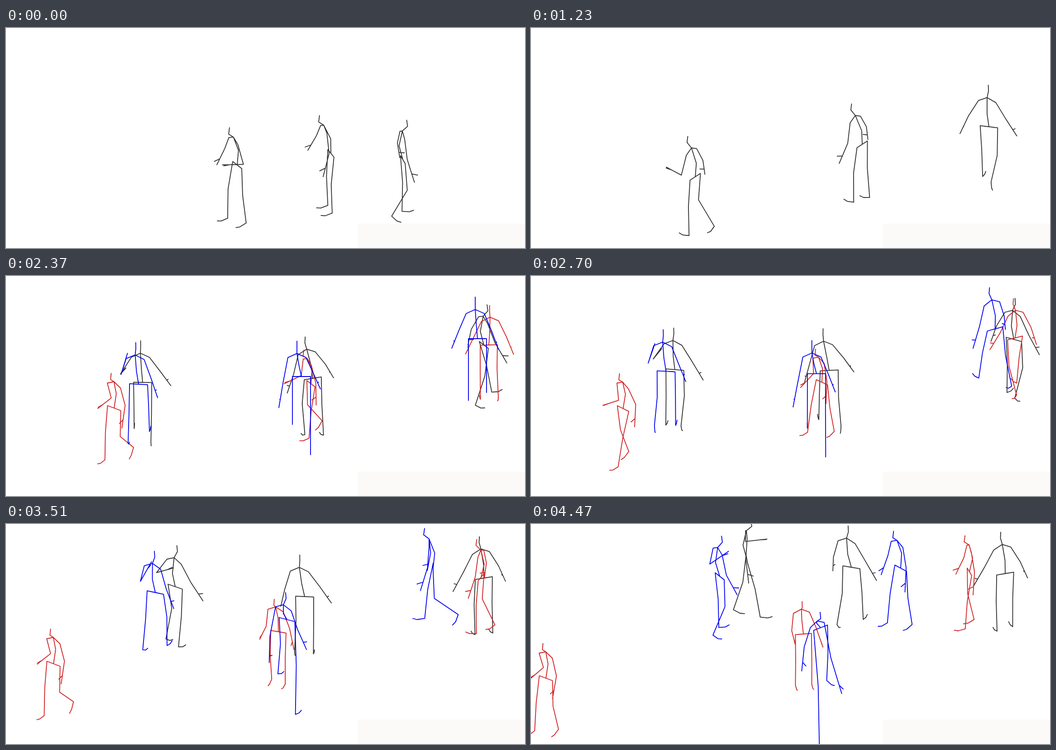
Write an HTML page that moves like this. It is 1147 by 488 pixels and loops after 4500 ms.

```html
<!DOCTYPE html>
<html lang="en">
<head>
<meta charset="utf-8">
<title>Walking skeletons</title>
<style>
html, body { margin: 0; width: 100%; height: 100%; overflow: hidden; background: #fff; }
svg { display: block; width: 1147px; height: 488px; }
path { fill: none; stroke-width: 1.8; stroke-linecap: round; stroke-linejoin: round; }
</style>
</head>
<body>
<svg viewBox="0 0 1147 488"><g id="people"></g><rect x="777" y="434" width="370" height="54" fill="#fbfaf8"/></svg>
<script>
const LOOP = 4500, STEP = 30, SPLIT = 1500, BLEND = 420;
const INK = '#303030', RED = '#d02222', BLUE = '#0000f0';
const TIMES = [0, 1230, 1920, 2370, 3030, 3510, 4470];
const TILT = 0.45;        // how much ground depth shows as height
const FULL_SPEED = 0.12;  // px per ms at which the stride is widest
const { sin, cos, min, max, floor, hypot, PI } = Math;
const mix = (a, b, f) => a + (b - a) * f;

// Smooth curve through keys of [time, x, y, heading].
function along(keys, time) {
  const last = keys.length - 1;
  const slope = (i, c) => {
    const a = keys[max(i - 1, 0)], b = keys[min(i + 1, last)];
    return (b[c] - a[c]) / (b[0] - a[0]);
  };
  let i = 0;
  while (i < last - 1 && keys[i + 1][0] <= time) i++;
  const a = keys[i], b = keys[i + 1], span = b[0] - a[0];
  const u = min(1, max(0, (time - a[0]) / span)), v = 1 - u;
  return [1, 2, 3].map(c =>
    a[c] * v * v * (1 + 2 * u) + b[c] * u * u * (3 - 2 * u) +
    span * u * v * (slope(i, c) * v - slope(i + 1, c) * u));
}

function pace(keys, time) {
  const [a, b] = [time - 60, time + 60].map(t => along(keys, min(LOOP - STEP, max(keys[0][0], t))));
  return min(1, hypot(b[0] - a[0], (b[1] - a[1]) / TILT) / 120 / FULL_SPEED);
}

// Polylines of one body; heading 0 looks right, 90 at the viewer.
function body(person, time) {
  const { keys, size = 1, lean = -5, period, phase, warp = 0 } = person;
  const [x, y, heading] = along(keys, time);
  const h = heading * PI / 180, amount = pace(keys, time);
  const grow = warp * max(0, time - SPLIT) / (LOOP - SPLIT);

  const move = ([px, py], ahead, side, down) => [
    px + size * (ahead * cos(h) + side * sin(h)),
    py + size * (TILT * (ahead * sin(h) - side * cos(h)) + down)
  ];
  const reach = (from, length, angle, out = 0) =>
    move(from, length * sin(angle) * cos(out), length * sin(out), length * cos(angle) * cos(out));

  const pelvis = [x, y];
  const [tx, ty] = move(pelvis, 4, 0, -63 * (1 - 0.75 * grow));
  const thorax = [tx + lean, ty];
  const spine = move([(x + thorax[0]) / 2, (y + thorax[1]) / 2], -8, 0, 0);
  const head = move(thorax, 12, 0, -9), top = move(thorax, 10, 0, -23);

  const swing = side => 2 * PI * (time / period + phase + (side < 0 ? 0.5 : 0));

  function leg(side) {
    const turn = swing(side), stretch = side < 0 ? 1 + grow : 1;
    const thigh = 0.08 + 0.27 * amount * sin(turn);
    const shin = thigh - 0.1 - 0.85 * amount * max(0, cos(turn + 0.3)) ** 1.5;
    const pitch = PI / 2 - 0.15 - 1.1 * max(0, -shin);
    const hip = move(pelvis, 0, side * 20, 0);
    const knee = reach(hip, 60 * stretch, thigh);
    const ankle = reach(knee, 64 * stretch, shin);
    const ball = reach(ankle, 17, pitch);
    return [hip, knee, ankle, ball, reach(ball, 10, pitch + 0.4)];
  }

  function arm(side, { raise = 0, bend = 0.25, out = 0.45 }) {
    const stretch = side > 0 ? 1 + grow : 1;
    const upper = raise - 0.2 * amount * sin(swing(side));
    const lower = upper + bend, inward = side * out * (1 - 0.8 * bend);
    const shoulder = move(thorax, 0, side * 20, 9);
    const elbow = reach(shoulder, 42 * stretch, upper, side * out);
    const wrist = reach(elbow, 31 * stretch, lower, inward);
    const thumb = move(reach(wrist, 4, lower, inward), 12, 0, 0);
    return [[thorax, shoulder, elbow, wrist, reach(wrist, 18, lower, inward)], [wrist, thumb]];
  }

  return [
    [top, head, thorax, spine, pelvis],
    ...arm(1, person.left), ...arm(-1, person.right),
    [...leg(1).reverse(), pelvis, ...leg(-1)]
  ];
}

// A forecast leaves its leader's pose at the split.
function pose(person, time) {
  const lines = body(person, time);
  const f = (time - SPLIT) / BLEND;
  if (!person.leader || f >= 1) return lines;
  const from = body(person.leader, time);
  return lines.map((line, i) => line.map((p, j) => p.map((v, c) => mix(from[i][j][c], v, f))));
}

const people = [];
const group = document.getElementById('people');

function add(color, route, style, leader) {
  const path = document.createElementNS('http://www.w3.org/2000/svg', 'path');
  path.setAttribute('stroke', color);
  group.append(path);
  const times = TIMES.slice(-route.length);
  const keys = route.map((point, i) => [times[i], ...point]);
  if (leader) keys.unshift([SPLIT, ...along(leader.keys, SPLIT)]);
  const person = { path, keys, leader, left: {}, right: {}, ...style };
  people.push(person);
  return person;
}

const west = add(INK,
  [[511, 304, 150], [363, 330, 215], [312, 278, 265], [302, 236, 272], [340, 180, 290], [374, 139, 308], [477, 78, 355]],
  { period: 1440, phase: 0.65, left: { raise: -0.1, bend: 1.7, out: 0.6 }, right: { out: 0.6 } });
const centre = add(INK,
  [[718, 278, 160], [732, 258, 215], [688, 244, 250], [678, 227, 250], [644, 190, 277], [660, 161, 275], [708, 96, 290]],
  { period: 1200, phase: 0.12, lean: -12, left: { bend: 0.4, out: 0.3 }, right: { out: 0.65 } });
const east = add(INK,
  [[877, 292, 345], [1012, 219, 285], [1052, 180, 325], [1056, 153, 330], [1075, 131, 270], [1056, 120, 250], [1048, 110, 250]],
  { period: 1350, phase: 0.5, left: { out: 0.55 }, right: { out: 0.55 } });

add(RED, [[291, 301, 135], [239, 293, 130], [167, 298, 145], [105, 310, 130], [33, 342, 130]],
  { period: 1140, phase: 0.89, size: 0.95, lean: 2, left: { raise: -0.2, bend: 0.55, out: 0.2 }, right: { raise: -0.3, bend: 1.75, out: 0 } }, west);
add(RED, [[706, 245, 145], [674, 239, 150], [615, 234, 120], [602, 239, 110], [602, 244, 80]],
  { period: 1110, phase: 0.27, size: 0.9, left: { out: 0.4 }, right: { bend: 1.3, out: 0.1 } }, centre);
add(RED, [[1054, 181, 272], [1067, 153, 265], [1068, 125, 215], [1050, 118, 200], [969, 106, 165]],
  { period: 1200, phase: 0.57, size: 0.95, lean: 3, left: {}, right: {} }, east);

add(BLUE, [[306, 278, 260], [293, 240, 277], [309, 184, 277], [330, 152, 295], [417, 116, 330]],
  { period: 1200, phase: 0.72, lean: -8, left: { bend: 2.1, out: 0.3 }, right: { bend: 0.4, out: 0.4 } }, west);
add(BLUE, [[696, 242, 250], [653, 223, 270], [616, 213, 270], [621, 212, 300], [640, 230, 410]],
  { period: 1440, phase: 0.6, lean: -10, warp: 1, left: { out: 0.2 }, right: { out: 0.4 } }, centre);
add(BLUE, [[1049, 171, 275], [1042, 139, 270], [1002, 100, 205], [944, 96, 180], [817, 98, 140]],
  { period: 1200, phase: 0, left: { out: 0.4 }, right: { out: 0.4 } }, east);

const trace = line => 'M' + line.map(p => p.map(v => v.toFixed(1))).join('L');

function draw(time) {
  for (const person of people) {
    const hidden = time < person.keys[0][0];
    person.path.setAttribute('d', hidden ? '' : pose(person, time).map(trace).join(''));
  }
}

const start = performance.now();
function tick() {
  const elapsed = (performance.now() - start) % LOOP;
  draw(floor(elapsed / STEP) * STEP);
  requestAnimationFrame(tick);
}
tick();
</script>
</body>
</html>
```
